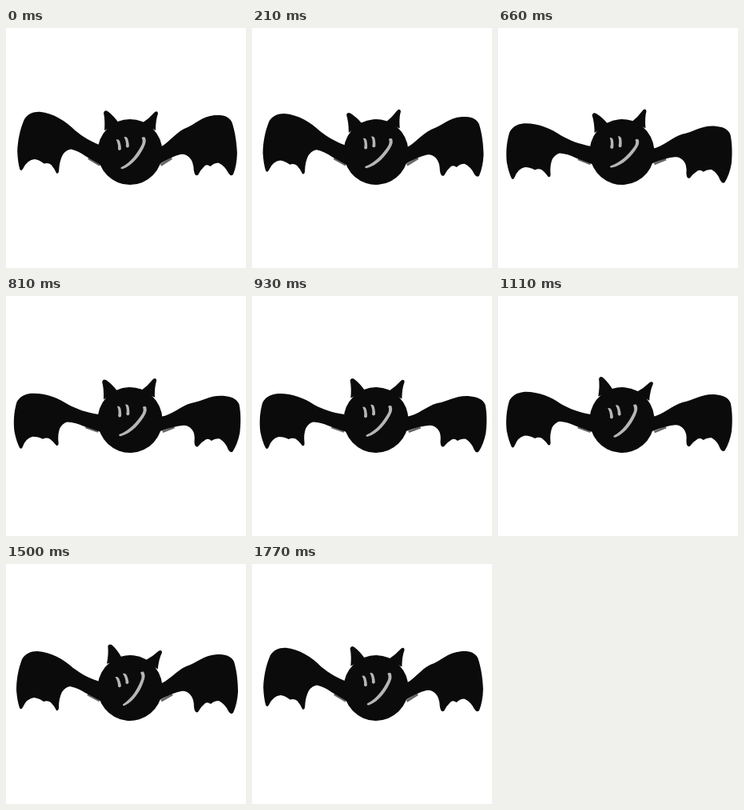
These frames come from a looping animation (300 px wide and 300 px high, 1.8 s). An HTML page:

```html
<!DOCTYPE html>
<html lang="en">
<head>
<meta charset="utf-8">
<title>Flapping bat</title>
<style>
  html, body { margin: 0; width: 100%; height: 100%; overflow: hidden; background: #fff; }
  svg { display: block; width: 100vw; height: 100vh; }
  .shade { fill: none; stroke: #666; stroke-width: 3; }
</style>
</head>
<body>
<svg viewBox="0 0 300 300" fill="#0b0b0b">
  <g id="left">
    <path class="shade" d="M102 163L117 171"/>
    <path d="M120 148C104 143 95 138 84 130C72 119 56 110 39 109C31 109 24 112 20 119
      C15 132 13 145 13 158Q14 171 17 180Q19 183 21 179Q26 168 35 167Q42 168 47 172
      Q52 170 56 173Q60 177 63 183Q66 184 66 179Q66 168 70 160Q74 154 80 153
      Q90 155 99 161L120 172Z"/>
  </g>
  <g id="right">
    <path class="shade" d="M208 163L194 171"/>
    <path d="M190 151C203 147 213 133 225 128C240 123 247 114 264 113C273 113 281 114 285 122
      C289 135 290 150 290 160Q289 175 284 186Q281 189 278 184Q274 175 266 171Q260 171 256 175
      Q252 172 249 174Q243 179 240 185Q236 187 235 179Q235 168 230 163Q225 158 219 159
      Q208 161 190 171Z"/>
  </g>
  <g id="head">
    <path d="M123 128Q124 115 122 106Q123 102 127 104Q135 110 141 119Z"/>
    <path d="M170 119Q179 113 186 105Q190 103 190 107Q187 115 187 128Z"/>
    <ellipse cx="155" cy="155" rx="40.5" ry="41"/>
  </g>
  <g id="face" fill="#b6b6b6">
    <path id="eye" d="M138 139Q142 138 143 143Q144 147 144 151Q142 154 140 151Q141 145 138 139Z"/>
    <use href="#eye" x="10" y="-3"/>
    <path d="M174 137Q176 141 174 146C169 158 158 172 145 176Q142 176 143 174
      C156 168 164 157 170 146Q172 141 170 138Q171 136 174 137Z"/>
  </g>
</svg>
<script>
  const LOOP = 1800, STEP = 30;
  const wave = ms => Math.sin(2 * Math.PI * ms / LOOP);
  const pose = (id, transform) => document.getElementById(id).setAttribute("transform", transform);

  // side is -1 for the left wing, 1 for the right
  function flap(id, x, side, sag) {
    pose(id, `translate(${x + side * 4 * sag} 160) rotate(${side * 9.5 * sag})
      scale(1 ${1 - 0.1 * sag}) translate(${-x} -160)`);
  }

  function draw() {
    const t = Math.floor(performance.now() % LOOP / STEP) * STEP;
    const sag = 0.25 - wave(t + LOOP / 4) / 2;
    flap("left", 112, -1, sag);
    flap("right", 197, 1, sag);
    pose("head", `rotate(${-7 * wave(t)} 155 155)`);
    pose("face", `rotate(${8 * wave(t - 60)} 155 152)`);
    requestAnimationFrame(draw);
  }
  draw();
</script>
</body>
</html>
```
